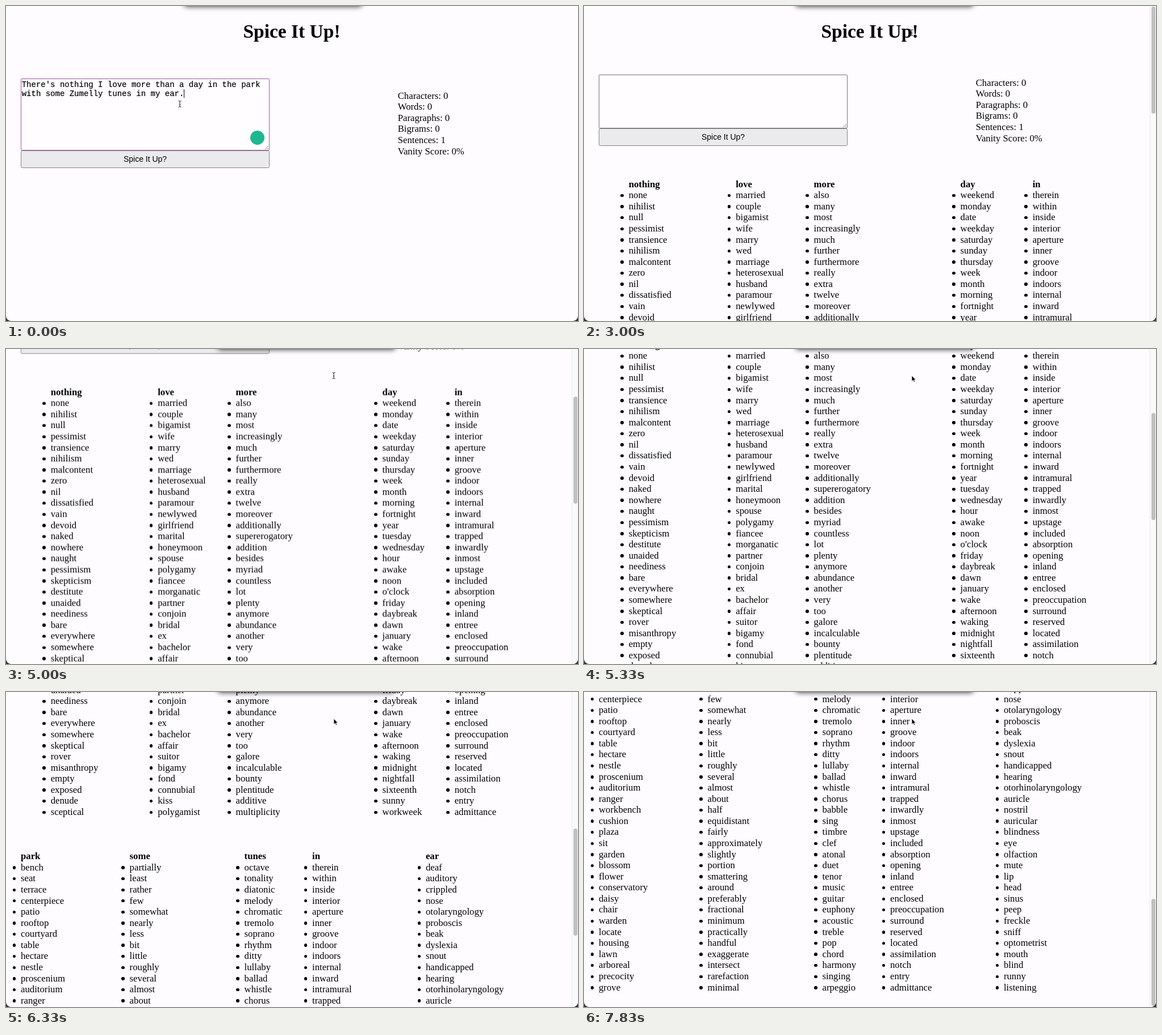
Animation, 1007 px wide and 556 px high, one loop 8 s. Source, as an HTML page:

```html
<!DOCTYPE html>
<html lang="en">
<head>
<meta charset="utf-8">
<title>Spice It Up!</title>
<style>
html, body { margin: 0; width: 100%; height: 100%; overflow: hidden; background: #333; }
#stage {
  position: relative; width: 1007px; height: 556px; overflow: hidden;
  background: #fefcff; border-radius: 0 0 9px 9px; color: #000;
  font: 16.74px/19.585px "Liberation Serif", Times, serif; white-space: pre;
}
#stage div, #stage svg { position: absolute; box-sizing: border-box; }
#page { left: 0; top: 0; width: 1007px; height: 1602px; will-change: transform; }
h1 {
  position: absolute; margin: 0; top: 25px; width: 1006px; text-align: center;
  font-size: 33.48px; line-height: 39px;
}
#box {
  left: 26px; top: 128px; width: 438px; height: 126.5px; padding: 2px 0 0 .7px;
  border: 1.3px solid #a157a6; border-radius: 2px; background: #fffdff;
  font: 14px/16px "Liberation Mono", Courier, monospace; -webkit-text-stroke: .2px #000;
}
#caret { left: 286px; top: 18px; width: 1px; height: 15px; background: #000; }
#badge { left: 402.5px; top: 91px; width: 25px; height: 25px; border-radius: 50%; background: #1fb78f; }
#grip { right: 0; bottom: 0; }
#button {
  left: 26px; top: 254.5px; width: 438px; height: 31px; text-align: center;
  border: 1px solid #858585; border-radius: 2.5px; background: #ebeaec;
  font: 13.95px/28.5px "Liberation Sans", Arial, sans-serif;
}
#stats { left: 689.7px; top: 148.7px; }
#stage.blur #box { border: 1px solid #767676; }
.blur #caret, .blur #badge { display: none; }
.done #box { top: 121px; height: 95.3px; }
.done #text { display: none; }
.done #button { top: 216px; }
.done #stats { top: 125.7px; }
.list, #bar { visibility: hidden; }
.done .list, .done #bar { visibility: visible; }
ul { list-style: none; margin: 0; padding: 0; }
li { position: relative; }
li::before {
  content: ""; position: absolute; left: -14.4px; top: 7.6px;
  width: 5.4px; height: 5.4px; border-radius: 50%; background: #000;
}
#bar { right: 0; top: 0; width: 11px; height: 556px; background: #fbfafb; border-left: 1px solid #e9e8e9; }
#thumb { left: 2px; top: 1px; width: 6.5px; height: 189px; border-radius: 3.5px; background: #c1c0c1; }
#shade {
  left: 312px; top: -20px; width: 316px; height: 19.5px; border-radius: 8px;
  box-shadow: 0 0 2px rgba(0,0,0,.45), 0 2px 9px rgba(0,0,0,.6);
}
#mouse { left: 0; top: 0; overflow: visible; }
</style>
</head>
<body>
<div id="stage">
  <div id="page">
    <h1>Spice It Up!</h1>
    <div id="box"><span id="text">There's nothing I love more than a day in the park
with some Zumelly tunes in my ear.</span><div id="caret"></div><div id="badge"></div><svg id="grip" width="8" height="8"><path d="M1 7L7 1M4.5 7L7 4.5" stroke="#777" stroke-width=".9"/></svg></div>
    <div id="button">Spice It Up?</div>
    <div id="stats">Characters: 0
Words: 0
Paragraphs: 0
Bigrams: 0
Sentences: 1
Vanity Score: 0%</div>
  </div>
  <div id="bar"><div id="thumb"></div></div>
  <div id="shade"></div>
  <svg id="mouse" width="20" height="20">
    <path id="beam" d="M-2.5 -5.5Q0 -5.5 0 -4Q0 -5.5 2.5 -5.5M0 -4.5V4.5M-2.5 5.5Q0 5.5 0 4Q0 5.5 2.5 5.5M-1.2 .8H1.2" fill="none" stroke="#222" stroke-width="1"/>
    <path id="arrow" d="M0 0V10.2L2.4 8L4 11.6L5.7 10.9L4.2 7.4H7.3Z" fill="#000" stroke="#fff" stroke-width=".8"/>
  </svg>
</div>
<script>
const $ = id => document.getElementById(id);
const IN = "in therein within inside interior aperture inner groove indoor indoors internal inward intramural trapped inwardly inmost upstage included absorption opening inland entree enclosed preoccupation surround reserved located assimilation notch entry admittance";
const upper = [
  [78.7, "nothing none nihilist null pessimist transience nihilism malcontent zero nil dissatisfied vain devoid naked nowhere naught pessimism skepticism destitute unaided neediness bare everywhere somewhere skeptical rover misanthropy empty exposed denude sceptical"],
  [267.2, "love married couple bigamist wife marry wed marriage heterosexual husband paramour newlywed girlfriend marital honeymoon spouse polygamy fiancee morganatic partner conjoin bridal ex bachelor affair suitor bigamy fond connubial kiss polygamist"],
  [404.6, "more also many most increasingly much further furthermore really extra twelve moreover additionally supererogatory addition besides myriad countless lot plenty anymore abundance another very too galore incalculable bounty plentitude additive multiplicity"],
  [662.6, "day weekend monday date weekday saturday sunday thursday week month morning fortnight year tuesday wednesday hour awake noon o'clock friday daybreak dawn january wake afternoon waking midnight nightfall sixteenth sunny workweek"],
  [789.7, IN]
];
const lower = [
  [26, "park bench seat terrace centerpiece patio rooftop courtyard table hectare nestle proscenium auditorium ranger workbench cushion plaza sit garden blossom flower conservatory daisy chair warden locate housing lawn arboreal precocity grove"],
  [217.6, "some partially least rather few somewhat nearly less bit little roughly several almost about half equidistant fairly approximately slightly portion smattering around preferably fractional minimum practically handful exaggerate intersect rarefaction minimal"],
  [419.6, "tunes octave tonality diatonic melody chromatic tremolo soprano rhythm ditty lullaby ballad whistle chorus babble sing timbre clef atonal duet tenor music guitar euphony acoustic treble pop chord harmony singing arpeggio"],
  [539, IN],
  [738.9, "ear deaf auditory crippled nose otolaryngology proboscis beak dyslexia snout handicapped hearing otorhinolaryngology auricle nostril auricular blindness eye olfaction mute lip head sinus peep freckle sniff optometrist mouth blind runny listening"]
];

function addLists(cols, top) {
  for (const [x, words] of cols) {
    const [head, ...items] = words.split(" ");
    const div = document.createElement("div");
    div.className = "list";
    div.style.cssText = `left:${x}px;top:${top}px`;
    div.innerHTML = `<b>${head}</b><ul>${items.map(w => `<li>${w}</li>`).join("")}</ul>`;
    $("page").append(div);
  }
}
addLists(upper, 304.7);
addLists(lower, 970.2);

// Scroll offset per step, starting at SCROLL_AT
const SCROLL_AT = 23, MAX = 1046;
const scroll = [2, 5, 10, 17, 28.5, 80, 160, 238.5, 290, 322, 342, 354, 370.5, 450, 570, 690, 790, 870, 935, 991];

const LOOP = 8000, FPS = 6, REPLY = 10;
const part = (k, a, b) => Math.min(1, Math.max(0, (k - a) / (b - a)));
const ease = p => p * p * (3 - 2 * p);
const mix = (a, b, p) => a + (b - a) * p;

function draw(t) {
  const k = Math.floor((t + 4) * FPS / 1000);
  const y = k < SCROLL_AT ? 0 : scroll[k - SCROLL_AT] ?? MAX;
  const down = ease(part(k, 0, 7)), away = ease(part(k, REPLY - 1, 14));
  const mx = mix(mix(306, 252, down), 577, away);
  const my = mix(mix(173, 270, down), 47, away);
  const arrow = k > 30 || (my > 254 && k < REPLY);

  $("stage").className = (k >= 7 ? "blur " : "") + (k >= REPLY ? "done" : "");
  $("page").style.transform = `translateY(${-y}px)`;
  $("thumb").style.transform = `translateY(${y * .348}px)`;
  $("shade").style.transform = `translateX(${59 * down}px)`;
  $("mouse").style.transform = `translate(${mx}px,${my}px)`;
  $("beam").style.display = arrow ? "none" : "";
  $("arrow").style.display = arrow ? "" : "none";
}

const start = performance.now();
function tick() {
  draw((performance.now() - start) % LOOP);
  requestAnimationFrame(tick);
}
tick();
</script>
</body>
</html>
```
